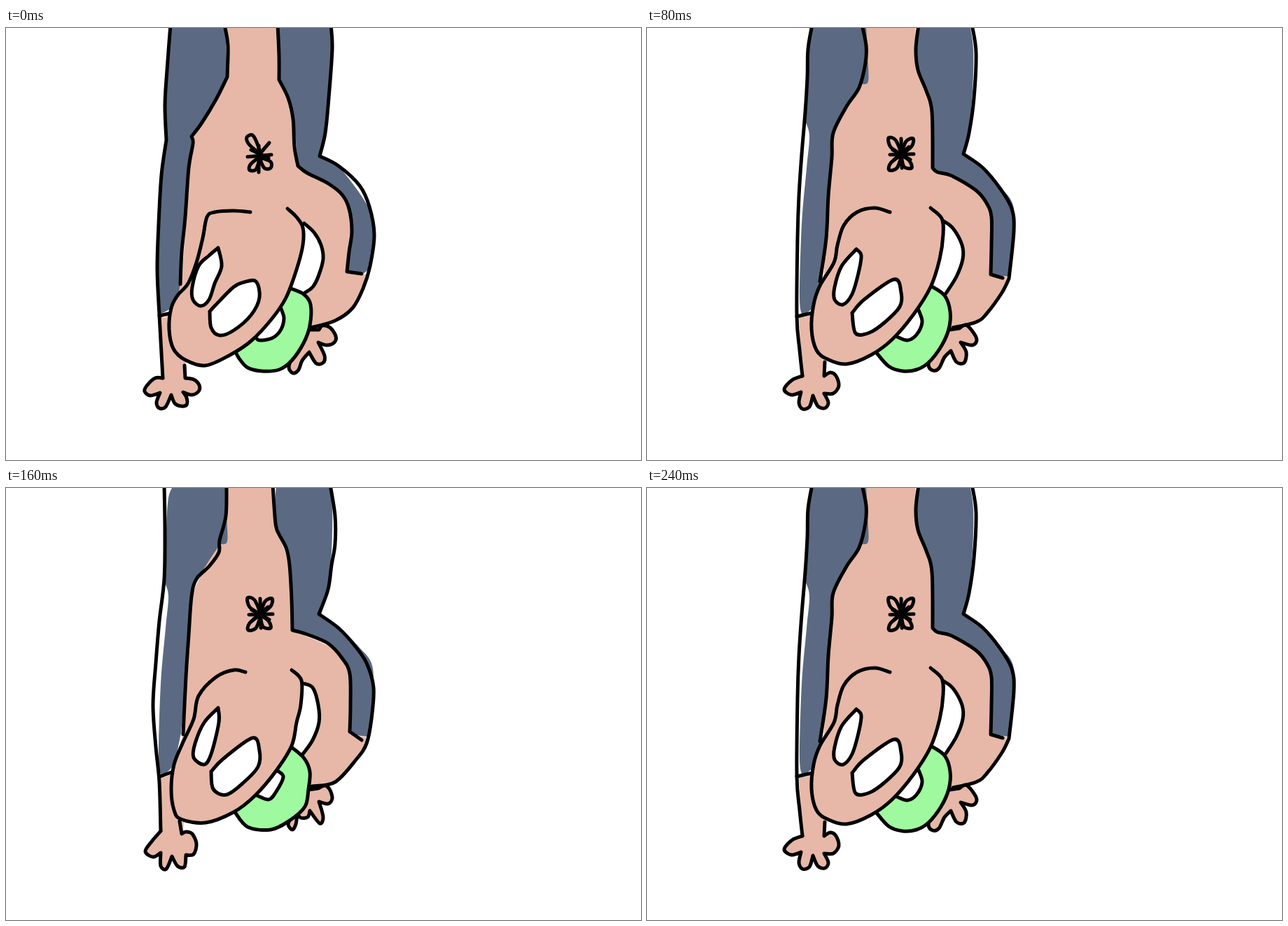
Write an HTML page with a canvas that moves like this. It is 907 px wide and 617 px high and loops after 320 ms.

```html
<!DOCTYPE html>
<html lang="en">
<head>
<meta charset="utf-8">
<title>Wobbly handstand</title>
<style>
html, body { margin: 0; width: 100%; height: 100%; overflow: hidden; background: #fff; }
canvas { display: block; }
</style>
</head>
<body>
<canvas id="stage" width="907" height="617"></canvas>
<script>
const ctx = document.getElementById('stage').getContext('2d');
const SKIN = '#e7b8a7', DENIM = '#5b6a82', GREEN = '#9ffa9f', WHITE = '#fff', INK = '#000';
const STEP = 80;

// Smooth line through "x,y" points; "|" marks a sharp corner at the point before it.
function curve(text) {
  const path = new Path2D();
  let last = null;
  for (const part of text.split('|')) {
    const points = part.trim().split(/\s+/).map(p => p.split(',').map(Number));
    if (last) points.unshift(last);
    else path.moveTo(...points[0]);
    const at = i => points[Math.max(0, Math.min(points.length - 1, i))];
    const handle = (i, sign) => [0, 1].map(k => at(i)[k] + sign * (at(i + 1)[k] - at(i - 1)[k]) / 6);
    for (let i = 0; i < points.length - 1; i++)
      path.bezierCurveTo(...handle(i, 1), ...handle(i + 1, -1), ...at(i + 1));
    last = points[points.length - 1];
  }
  return path;
}

const neatPaint = {
  torso: '314,-5 315,70 | 267,155 263,200 252,350 | 232,408 221,412 | 225,500 | 255,500 | 257,475 | 290,478 | 436,428 470,418 497,398 516,352 | 487,349 | 494,290 480,238 417,197 | 411,130 390,72 | 387,-5',
  leftLeg: '235,-5 231,60 228,110 230,160 223,210 219,280 218,340 220,409 | 241,395 249,366 | 256,270 265,157 | 300,102 316,70 | 313,-5',
  rightLeg: '389,-5 391,74 | 410,130 417,197 | 460,222 480,238 494,290 487,348 | 508,351 517,345 | 525,295 517,255 475,198 448,183 | 455,150 460,100 465,30 464,-5'
};
const loosePaint = {
  torso: '312,-5 313,60 | 268,148 261,200 253,350 | 236,406 217,412 | 222,497 | 253,497 | 254,474 | 288,477 | 437,426 470,418 505,381 516,356 | 491,352 | 492,270 470,232 410,204 | 407,120 386,60 | 383,-5',
  leftLeg: '240,-5 232,14 229,60 227,135 | 232,155 228,200 221,280 218,385 222,411 | 239,395 250,350 | 260,240 266,150 285,112 306,80 | 316,76 315,40 313,-5',
  rightLeg: '386,-5 384,30 387,60 399,90 407,120 409,203 | 440,215 470,232 492,270 492,352 | 516,355 | 522,330 525,275 521,248 505,228 480,203 450,181 | 460,140 465,90 466,30 461,-5'
};

const star = [
  '363,180 348,170 345,157 355,160 364,180',
  '363,180 370,162 380,158 378,169 363,181',
  '363,181 348,193 346,203 357,200 364,182',
  '363,181 375,190 378,200 367,198 363,182',
  '347,181 381,180', '363,158 364,200', '351,174 376,188', '353,188 374,170'
];

const upright = {
  paint: neatPaint,
  lines: [
    '235,-5 230,60 227,110 229,160 | 222,210 218,280 216,345 219,410 224,500',
    '219,411 232,408',
    '312,-5 317,25 316,70 | 300,102 280,135 265,155 | 267,165 261,200 256,270 251,320 249,366',
    '388,-5 390,40 390,74 | 403,100 410,130 412,170 417,197 | 430,207 460,222 480,238 490,258 494,290 490,320 487,348 | 508,351',
    '464,-5 466,30 461,100 456,150 448,183 | 475,197 505,225 519,255 526,295 520,340 510,372 495,400 470,418 436,428'
  ],
  mark: [
    '363,180 347,166 344,156 352,153 358,163 364,180',
    '345,184 379,181', '376,164 358,185', '350,174 375,186',
    '362,184 349,195 348,203 357,202 363,185',
    '363,185 378,191 378,200 369,200 362,186', '361,168 361,206'
  ],
  leftHand: '224,500 213,500 201,511 198,519 206,525 220,521 | 215,535 219,543 228,541 236,524 | 241,536 250,540 258,538 258,528 253,520 | 265,524 275,519 276,510 268,502 256,500 | 255,482',
  rightHand: '432,431 447,431 | 452,425 463,428 471,440 469,449 458,453 446,449 | 455,468 453,478 443,479 433,463 | 423,475 418,488 410,493 404,485 408,470',
  ear: '426,279 440,292 450,310 453,330 446,355 438,370 427,378',
  ring: '404,371 425,380 435,395 434,425 425,450 408,475 390,488 365,490 345,485 333,472 327,461',
  hole: '393,401 397,415 392,432 380,443 362,446 357,442',
  head: '349,263 325,261 298,263 287,270 281,300 272,335 260,365 245,382 236,400 233,430 239,458 256,474 285,482 320,467 350,447 380,415 400,385 415,345 424,310 424,285 415,270 402,258',
  eyes: [
    '303,314 308,340 298,365 290,388 278,397 267,388 266,370 275,340 290,325 303,314',
    '291,405 300,395 325,370 340,363 357,362 362,385 350,410 325,432 305,439 293,428 291,405'
  ]
};

const middle = {
  paint: loosePaint,
  lines: [
    '236,-5 230,30 229,70 226,120 221,180 217,240 215,300 214,412 218,460 222,497',
    '214,412 236,407',
    '307,-5 313,25 312,50 303,85 285,112 266,150 264,185 259,240 256,300 247,362',
    '388,-5 384,30 387,60 399,90 407,120 408,200 | 415,206 435,211 470,232 485,250 492,270 492,310 491,352 | 508,357',
    '464,-5 470,35 467,100 460,150 452,180 | 480,200 505,230 521,258 524,290 517,358 | 507,378 485,408 470,420 437,428'
  ],
  mark: star,
  leftHand: '222,497 207,503 196,516 206,524 220,520 | 217,535 222,544 232,541 237,525 | 244,540 254,543 259,535 253,522 | 266,522 274,511 270,497 262,492 253,497 | 254,477',
  rightHand: '432,431 446,429 | 455,424 464,432 471,445 465,453 448,449 | 456,463 453,478 442,477 434,461 | 425,470 417,486 408,489 402,481 406,462',
  ear: '424,276 437,286 450,310 451,330 442,355 427,379',
  ring: '405,368 425,382 433,405 431,430 420,455 402,478 385,488 365,490 345,483 327,463',
  hole: '388,403 393,420 385,438 372,446 357,441',
  head: '347,263 325,257 300,263 281,282 272,310 267,335 247,368 238,395 235,430 242,460 258,473 285,480 320,467 350,445 380,410 405,370 418,330 423,295 421,272 405,257',
  eyes: [
    '299,316 306,325 302,350 293,380 280,395 268,388 268,370 278,340 299,316',
    '293,407 310,388 353,359 363,378 361,398 340,420 318,435 298,436 293,407'
  ]
};

const leaning = {
  paint: loosePaint,
  lines: [
    '226,-5 227,60 226,130 219,190 214,250 210,310 214,370 219,420 221,490',
    '220,412 236,406',
    '315,-5 314,40 305,75 304,92 290,112 272,130 265,155 261,210 257,270 253,352',
    '381,-5 384,40 387,60 400,85 405,110 408,160 409,203 | 430,209 460,222 480,243 491,265 492,310 491,348 | 508,360',
    '463,-5 470,40 470,80 465,110 460,145 447,180 | 475,200 498,225 515,250 525,285 522,330 515,365 500,388 470,420 437,426'
  ],
  mark: star,
  leftHand: '221,490 208,505 199,519 210,527 221,521 | 221,540 229,544 237,526 | 245,540 255,541 257,524 | 268,523 272,508 266,494 257,491 251,494 | 248,476',
  rightHand: '432,431 446,429 | 455,425 462,430 466,443 460,451 447,448 | 453,470 448,479 434,461 | 431,470 421,471 416,465 | 414,480 409,488 403,480 410,467 | 403,463',
  ear: '424,279 438,285 446,310 447,335 438,360 424,380',
  ring: '405,368 425,385 434,405 432,430 427,455 405,475 378,488 345,484 327,463',
  hole: '388,404 396,413 385,435 375,445 358,439',
  head: '342,263 325,260 300,270 275,297 268,330 252,365 240,395 236,430 240,460 250,473 285,478 325,463 355,440 385,405 408,368 415,335 421,310 422,275 408,260',
  eyes: [
    '303,314 304,335 293,380 283,395 268,385 270,365 283,335 303,314',
    '293,405 310,387 352,357 362,375 360,398 340,420 315,438 296,430 293,405'
  ]
};

function fill(text, color) {
  ctx.fillStyle = color;
  ctx.fill(curve(text));
}

function ink(text) {
  ctx.stroke(curve(text));
}

function shape(text, color) {
  fill(text, color);
  ink(text);
}

function draw(pose) {
  ctx.fillStyle = WHITE;
  ctx.fillRect(0, 0, 907, 617);
  ctx.strokeStyle = INK;
  ctx.lineWidth = 5;
  ctx.lineCap = ctx.lineJoin = 'round';

  fill(pose.paint.torso, SKIN);
  fill(pose.paint.leftLeg, DENIM);
  fill(pose.paint.rightLeg, DENIM);
  shape(pose.leftHand, SKIN);
  shape(pose.rightHand, SKIN);
  fill(pose.ear + ' | 404,370', WHITE);
  ink(pose.ear);
  pose.lines.forEach(ink);
  shape(pose.ring, GREEN);
  shape(pose.hole, WHITE);
  shape(pose.head, SKIN);
  pose.eyes.forEach(eye => shape(eye, WHITE));
  pose.mark.forEach(ink);
}

const cycle = [upright, middle, leaning, middle];

function tick() {
  draw(cycle[Math.floor(performance.now() / STEP) % cycle.length]);
  requestAnimationFrame(tick);
}
tick();
</script>
</body>
</html>
```
